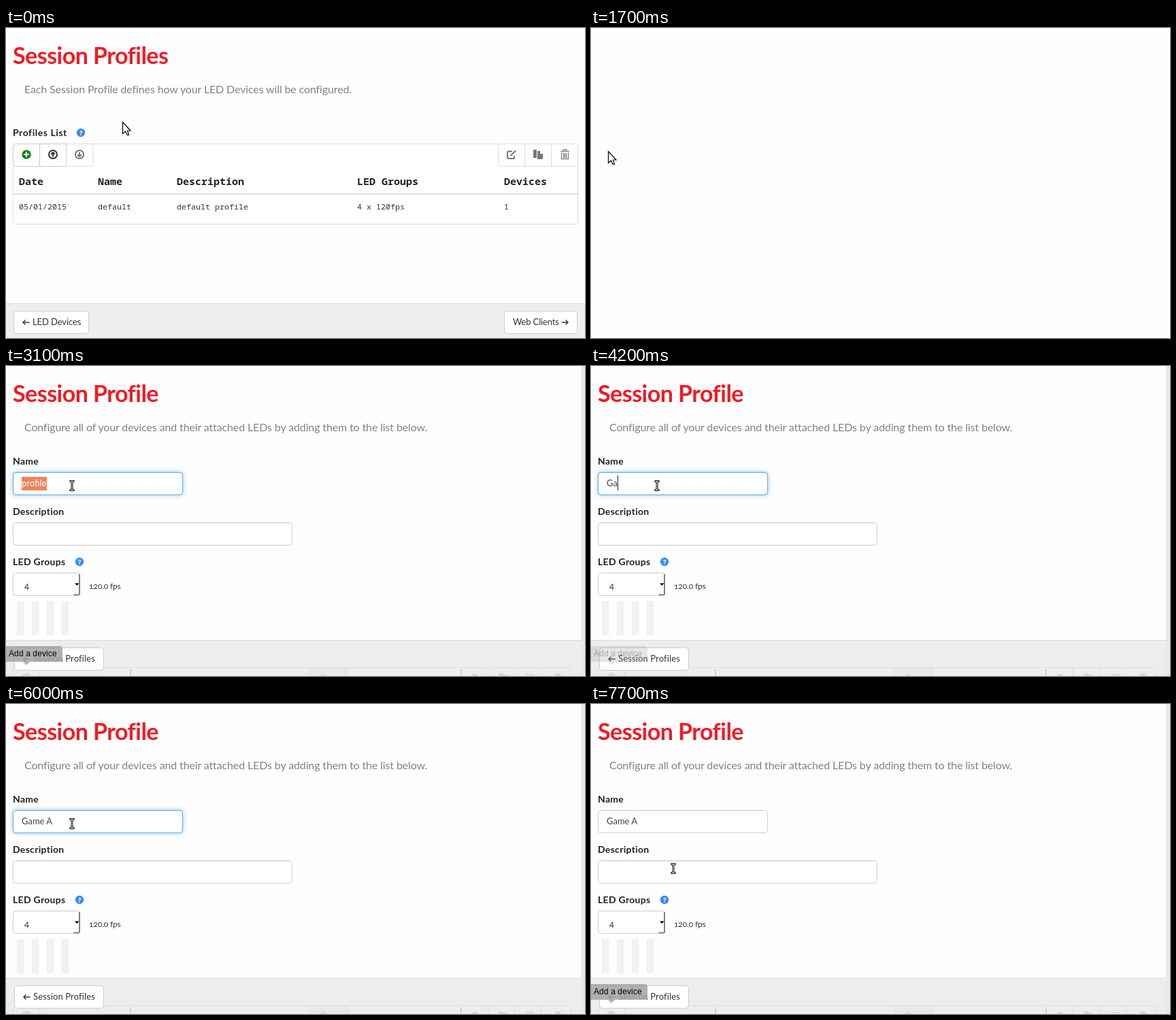
Recreate the animation shown at these times as an HTML page. Size 851 by 456 pixels, loop 8 s.

```html
<!DOCTYPE html>
<html lang="en">
<head>
<meta charset="utf-8">
<title>Session Profiles</title>
<style>
html, body { margin: 0; width: 100%; height: 100%; overflow: hidden; background: #fefefe; }
svg { display: block; }
text { font: 13px Lato, sans-serif; fill: #333; white-space: pre; }
.title { font-size: 34px; font-weight: 700; letter-spacing: -.52px; fill: #ee1c25; }
.lead { font-size: 16px; letter-spacing: -.13px; fill: #828282; }
.label { font-size: 14px; font-weight: 700; letter-spacing: .3px; fill: #222; }
.th { font: 700 15px "Noto Sans Mono", monospace; fill: #222; }
.td { font: 11.67px "Noto Sans Mono", monospace; }
.num { font-variant-numeric: oldstyle-nums; letter-spacing: -.15px; }
.tip rect, .tip path { fill: #a5a5a5; fill-opacity: .88; }
.tip text { font: 12px "Liberation Sans", sans-serif; letter-spacing: .11px; fill: #000; }
.btn { fill: #fff; stroke: #ccc; }
.soft { stroke: #ddd; }
.line { fill: none; stroke: #333; stroke-width: 1.4; }
.bold { stroke-width: 2; }
.dim { stroke: #777; }
.help circle { fill: #3d8bf2; }
.help text { font-size: 10px; font-weight: 900; fill: #fff; text-anchor: middle; }
.ghost { fill: none; stroke: #dedede; }
</style>
</head>
<body>
<svg width="851" height="456" viewBox="0 0 851 456">
  <defs>
    <g id="help" class="help"><circle r="6.2"/><text y="3.6">?</text></g>
    <path id="left" class="line" d="M10.5 0H1M4.5 -3.5L1 0L4.5 3.5"/>
    <filter id="blur" x="-10%" y="-50%" width="120%" height="200%"><feGaussianBlur stdDeviation="3"/></filter>
  </defs>

  <g id="list">
    <text class="title" x="10" y="52.5">Session Profiles</text>
    <text class="lead" x="27" y="96">Each Session Profile defines how your LED Devices will be configured.</text>
    <text class="label" x="10" y="159" style="letter-spacing:.55px">Profiles List</text>
    <use href="#help" x="110" y="154"/>
    <rect class="btn soft" x="10.5" y="170.5" width="830" height="118" rx="4"/>
    <path class="btn soft" d="M88.5 170.5H124a4 4 0 0 1 4 4V199.5a4 4 0 0 1 -4 4H88.5Z"/>
    <path class="btn" id="add" d="M14.5 170.5H49.5V203.5H14.5a4 4 0 0 1 -4 -4V174.5a4 4 0 0 1 4 -4Z"/>
    <path class="btn" d="M49.5 170.5H88.5V203.5H49.5Z"/>
    <rect class="btn soft" x="723.5" y="170.5" width="117" height="33" rx="4"/>
    <path class="btn soft" d="M762.5 170.5V203.5M801.5 170.5V203.5"/>
    <circle id="plus" cx="30" cy="186" r="6.6"/>
    <path d="M26 186H34M30 182V190" stroke="#fff" stroke-width="2.2"/>
    <g transform="translate(69 186)">
      <circle class="line bold" r="6"/>
      <path class="line bold" d="M0 3.6V-2.5M-2.8 -.2L0 -3L2.8 -.2"/>
    </g>
    <g transform="translate(108 186)">
      <circle class="line bold dim" r="6"/>
      <path class="line bold dim" d="M0 -3.6V2.5M-2.8 .2L0 3L2.8 .2"/>
    </g>
    <path class="line bold dim" d="M744 181.5H738.5a1.5 1.5 0 0 0 -1.5 1.5V190.5a1.5 1.5 0 0 0 1.5 1.5H745.5a1.5 1.5 0 0 0 1.5 -1.5V188M741.5 188L749 180.5"/>
    <path fill="#777" d="M775 179H779L782 182V191H775Z"/>
    <path fill="#777" stroke="#fff" d="M780.5 180.5H785.5L789.5 184.5V193.5H780.5ZM785.5 180.5V184.5H789.5"/>
    <path class="line" style="stroke:#7d8793" d="M815 181.5H828M819 181V179H824V181M816.5 183V192.5H826.5V183M819.5 184V191M821.5 184V191M823.5 184V191"/>
    <g id="cells"></g>
    <path d="M11 244H840" stroke="#ddd" stroke-width="2"/>
    <rect y="405" width="851" height="51" fill="#eee"/>
    <path d="M0 405.5H851" stroke="#ddd"/>
    <rect class="btn" x="11.5" y="416.5" width="110" height="33" rx="4"/>
    <use href="#left" x="24" y="433"/>
    <text x="39" y="437" style="letter-spacing:-.1px">LED Devices</text>
    <rect class="btn" x="732.5" y="416.5" width="107" height="33" rx="4"/>
    <text x="745" y="437" style="letter-spacing:-.15px">Web Clients</text>
    <use href="#left" transform="translate(827 433) scale(-1 1)"/>
    <g class="tip" id="createTip">
      <rect x="-4" y="138" width="145" height="24" rx="4"/>
      <path d="M25 162H35L30 167Z"/>
      <text x="4" y="154">Create a session profile</text>
    </g>
  </g>

  <g id="form">
    <text class="title" x="10" y="52.5">Session Profile</text>
    <text class="lead" x="27" y="96">Configure all of your devices and their attached LEDs by adding them to the list below.</text>
    <text class="label" x="10" y="145">Name</text>
    <rect id="glow" x="9.5" y="155.5" width="251" height="35" rx="5" fill="#66afe9" filter="url(#blur)"/>
    <rect class="btn" x="10.5" y="156.5" width="249" height="33" rx="4"/>
    <path d="M13 157.5H257" stroke="#f0f0f0"/>
    <rect id="ring" x="10.5" y="156.5" width="249" height="33" rx="4" fill="none" stroke="#5fabe8"/>
    <rect id="mark" x="23" y="163" width="37" height="20" fill="#f0845a"/>
    <text id="name" x="23" y="177"></text>
    <path id="caret" d="M0 161V183" stroke="#222"/>
    <text class="label" x="10" y="219">Description</text>
    <rect class="btn" x="10.5" y="230.5" width="410" height="33" rx="4"/>
    <path d="M13 231.5H418" stroke="#f0f0f0"/>
    <text class="label" x="10" y="293">LED Groups</text>
    <use href="#help" x="108" y="288"/>
    <rect class="btn" x="10.5" y="304.5" width="98" height="33" rx="4"/>
    <path d="M99.5 336.5H106.5a1.5 1.5 0 0 0 1.5 -1.5V306" fill="none" stroke="#808080" stroke-width="2"/>
    <path d="M101 319.5H107.5L104.25 323Z"/>
    <text class="num" x="27" y="328">4</text>
    <text class="num" x="122" y="328" style="font-size:12px">120.0 fps</text>
    <path fill="#f2f2f2" stroke="#ededed" d="M16.5 346.5h9v49h-9ZM38.5 346.5h9v49h-9ZM60.5 346.5h9v49h-9ZM82.5 346.5h9v49h-9Z"/>
    <rect y="403" width="845" height="53" fill="#ededed"/>
    <path d="M0 403.5H845" stroke="#dadada"/>
    <rect x="445" y="444" width="57" height="12" fill="#e8e8e8"/>
    <path class="ghost" d="M10.5 456V447.5a4 4 0 0 1 4 -4H826.5a4 4 0 0 1 4 4V456M49.5 444V456M502.5 444V456M708.5 444V456M747.5 444V456M786.5 444V456"/>
    <path d="M183 446V456M669 446V456" stroke="#d2d2d2" stroke-width="2"/>
    <path fill="#d9d9d9" d="M24 456a6 4.5 0 0 1 12 0ZM461 456l5 -4l5 4ZM685 456v-3h9v3ZM724 456v-4h6l2 2h5v2ZM764 453h13v2h-13ZM806 456a5 4.5 0 0 1 10 0Z"/>
    <rect x="845" width="6" height="456" fill="#e8e8e8"/>
    <rect class="btn" x="12.5" y="414.5" width="131" height="33" rx="4"/>
    <use href="#left" x="25" y="431"/>
    <text x="40" y="435" style="letter-spacing:.13px">Session Profiles</text>
    <g class="tip" id="deviceTip">
      <rect x="-4" y="412" width="87" height="23" rx="4"/>
      <path d="M25 435H35L30 440Z"/>
      <text x="4" y="427">Add a device</text>
    </g>
  </g>

  <g id="cursor">
    <path id="arrow" d="M.5 .5V17.5L4.5 14L7 19.5H9.5L7.5 13H12Z" fill="#fff" stroke="#000" stroke-width="1.2"/>
    <g id="hand" fill="#fff" stroke="#000" stroke-width="1.3" stroke-linejoin="round">
      <path d="M-1.5 8V0a1.5 1.5 0 0 1 3 0V4.5L4 4L8 5.5L9 7V10.5L7.5 14H-1.5L-4.5 10.5a1.3 1.3 0 0 1 2 -2Z"/>
      <path d="M1.5 4.5V7.5M4 4.5V7.5M6.5 5V8M0 11V14M3 11V14M6 11V14" stroke-width=".9"/>
    </g>
    <g id="beam" fill="none">
      <path d="M-3.5 -6.5H3.5M-3.5 6.5H3.5M0 -7V7" stroke="#000" stroke-width="3"/>
      <path d="M-2.5 -6.5H2.5M-2.5 6.5H2.5M0 -6.5V6.5" stroke="#fff"/>
    </g>
  </g>
</svg>
<script>
const $ = id => document.getElementById(id);
const show = (id, on) => $(id).setAttribute('opacity', +on);
const ramp = (t, a, b) => Math.min(1, Math.max(0, (t - a) / (b - a)));

const columns = [
  [19, 'Date', '05/01/2015'], [135, 'Name', 'default'], [251, 'Description', 'default profile'],
  [516, 'LED Groups', '4 x 120fps'], [732, 'Devices', '1']
];
$('cells').innerHTML = columns.map(([x, head, cell]) =>
  `<text class="th" x="${x}" y="231">${head}</text><text class="td" x="${x}" y="267">${cell}</text>`).join('');

// Each leg of the pointer: start, end, target x and y
const legs = [[300, 800, 25, 181], [2000, 2700, 97, 176], [7100, 7700, 121, 242]];
const typing = [[4100, 'G'], [4200, 'a'], [4400, 'm'], [4500, 'e'], [5000, ' '], [5500, 'A']];
const caretX = [23, 32.5, 39.5, 50.5, 57.5, 60.5, 69.5];

function pointer(t) {
  let x = 171, y = 138;
  for (const [a, b, tx, ty] of legs) {
    const p = ramp(t, a, b), e = 1 - (1 - p) ** 2;
    x += (tx - x) * e;
    y += (ty - y) * e;
  }
  return [Math.round(x), Math.round(y)];
}

function draw(now) {
  const t = Math.floor(now % 8000 / 100) * 100;
  const onForm = t >= 1700;
  const [x, y] = pointer(t);

  show('list', !onForm);
  show('form', ramp(t, 1700, 2500));

  const hover = t >= 700;
  show('createTip', ramp(t, 600, 800));
  $('add').style.fill = hover ? '#e6e6e6' : '#fff';
  $('add').style.stroke = hover ? '#adadad' : '#ccc';
  $('plus').style.fill = hover ? '#333' : '#0a800a';

  const focus = ramp(t, 2900, 3100) * (1 - ramp(t, 6000, 6400));
  show('glow', focus * focus * .6);
  show('ring', focus);
  show('deviceTip', t < 4500 ? ramp(t, 2400, 2700) * (1 - ramp(t, 4000, 4300)) : ramp(t, 6150, 6500));

  const typed = typing.filter(([at]) => t >= at);
  const selected = t >= 3100 && !typed.length;
  show('mark', selected);
  $('name').textContent = typed.length ? typed.map(k => k[1]).join('') : 'profile';
  $('name').style.fill = selected ? '#fff' : '#444';
  show('caret', typed.length && t < 6000);
  $('caret').setAttribute('transform', `translate(${caretX[typed.length]} 0)`);

  const inField = t >= 2100 && (x < 260 && y > 156 && y < 190 || y > 230);
  const onButton = t < 1500 && y > 170 && x < 89;
  show('beam', inField);
  show('hand', onButton);
  show('arrow', !inField && !onButton);
  $('cursor').setAttribute('transform', `translate(${x} ${y})`);
  requestAnimationFrame(() => draw(performance.now() - start));
}
const start = performance.now();
draw(0);
</script>
</body>
</html>
```
